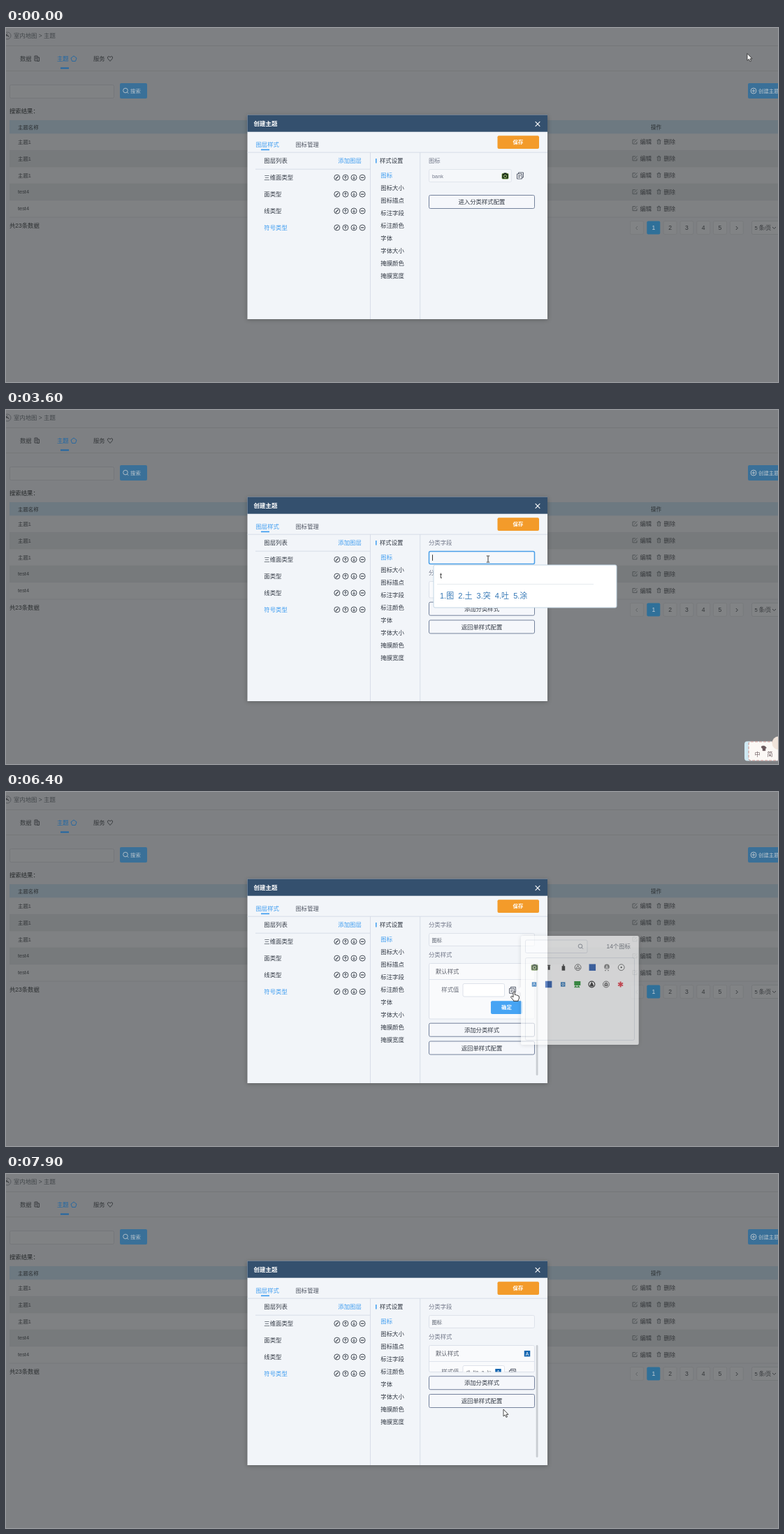
Write an HTML page that moves like this. It is 1105 by 507 pixels and loops after 8000 ms.

```html
<!DOCTYPE html>
<html>
<head>
<meta charset="utf-8">
<style>
html, body { margin: 0; width: 100%; height: 100%; overflow: hidden; background: #7e8083; }
svg { display: block; width: 1105px; height: 507px; }
text { font-family: "Liberation Sans", "Noto Sans CJK SC", "Noto Sans CJK", sans-serif; white-space: pre; }
</style>
</head>
<body>
<svg id="stage" viewBox="0 0 1105 507"></svg>
<script>
const INK = '#333a45', BLUE = '#3f9df0', GREY = '#73798a', DIM = '#34373a', DIMBLUE = '#2067a4';

// Text takes its vertical centre, not the baseline.
const text = (s, x, y, fill = INK, size = 8.4, extra = '') =>
  `<text x="${x}" y="${y + size * .37}" fill="${fill}" font-size="${size}" ${extra}>${s}</text>`;
const mid = (s, x, y, fill, size, extra = '') => text(s, x, y, fill, size, 'text-anchor="middle" ' + extra);
const rect = (x, y, w, h, fill, stroke = 'none', r = 0, extra = '') =>
  `<rect x="${x}" y="${y}" width="${w}" height="${h}" rx="${r}" fill="${fill}" stroke="${stroke}" ${extra}/>`;
const path = (d, stroke = INK, fill = 'none', w = .9) =>
  `<path d="${d}" stroke="${stroke}" fill="${fill}" stroke-width="${w}" stroke-linejoin="round"/>`;
const circle = (x, y, r, fill = 'none', stroke = 'none', w = .9) =>
  `<circle cx="${x}" cy="${y}" r="${r}" fill="${fill}" stroke="${stroke}" stroke-width="${w}"/>`;
const at = (x, y, s) => `<g transform="translate(${x} ${y})">${s}</g>`;
const group = (id, s, extra = '') => `<g id="${id}" ${extra}>${s}</g>`;
const lens = (x, y, c, r = 3) => circle(x, y, r, 'none', c) + path(`M${x + r * .7} ${y + r * .7}l2 2`, c);
const outlineButton = (s, y) => rect(605.5, y + .5, 151, 19, '#f5f7fb', '#74829c', 2) + mid(s, 681, y + 10);
const copies = (x, y) => at(x, y, path('M-2.5-2.5V-4.5H4.5V2.5H2.5M-4.5-2.5H2.5V4.5H-4.5ZM-3 0H1M-3 2H0', '#4b5261'));
const badge = (x, y, s) => rect(x - s / 2, y - s / 2, s, s, '#1767b1', 'none', .5) + mid('A', x, y, '#fff', s * .8);
const camera = (x, y) => at(x, y,
  rect(-4.5, -3.5, 9, 7.5, '#18281b', '#6f9a35', 1, 'stroke-width=".8"') + rect(-2, -4.5, 4, 2, '#18281b') +
  circle(0, .4, 2, 'none', '#b9df78', 1));

function page() {
  let s = rect(0, 0, 1105, 507, '#7e8083') + rect(0, 25, 1105, 1, '#747678') + rect(0, 61, 1105, 1, '#757779');
  s += circle(2, 11, 5, 'none', '#55595d') + path('M4 13Q4 10 0 10M2 8L0 10L2 12', DIM);
  s += text('室内地图 &gt; 主题', 11, 11, '#43474b');
  s += text('数据', 20, 44, DIM) + path('M41 40h4v7h-4zM45 42h2.5v5.500h-3M42 42h2M42 44h2', DIM);
  s += text('主题', 73, 44, DIMBLUE) + path('M97 40l4 3l-1.500 4.500h-5l-1.500-4.500z', DIMBLUE);
  s += rect(78, 56.5, 12, 2, DIMBLUE);
  s += text('服务', 125, 44, DIM) + path('M149 47.500l-3.500-4q-.5-3 2-3l1.500 1.500l1.500-1.500q2.500 0 2 3z', DIM);
  s += rect(5.5, 81.5, 149, 19, '#808284', '#75777a', 2);
  s += rect(163, 79, 39, 22, '#3a7098', 'none', 2) + lens(171, 89.5, '#b9c4cc', 3.3) + text('搜索', 178, 90.5, '#b9c4cc', 7.4);
  s += rect(1062, 79, 46, 22, '#3a7098', 'none', 2) + circle(1070, 90, 4, 'none', '#b9c4cc') +
    path('M1067.500 90h5M1070 87.500v5', '#b9c4cc') + text('创建主题', 1077, 90.5, '#b9c4cc', 7.4);
  s += text('搜索结果：', 5, 119, '#25282a');
  s += rect(5, 132, 1100, 19.5, '#6d7981') + text('主题名称', 17, 142, '#2c3033', 7.4) + text('操作', 923, 142, '#2c3033', 7.6);
  ['主题1', '主题1', '主题1', 'test4', 'test4'].forEach((name, i) => {
    const y = 163 + 23.9 * i;
    s += rect(5, y - 11.5, 1100, 23.9, i % 2 ? '#777a7c' : '#7f8183') + rect(5, y + 12, 1100, .8, '#737678');
    s += text(name, 17, y, DIM, 7.4);
    s += at(900, y, path('M1-3H-3V3H3V0M-1 1L3.500-3.500', '#45494c', 'none', .8)) + text('编辑', 907.5, y, DIM);
    s += at(934.5, y, path('M-3-2H3M-1-2V-3.500H1V-2M-2-2V3H2V-2M0-.5V1.500', '#45494c', 'none', .8)) + text('删除', 941.5, y, DIM);
  });
  s += text('共23条数据', 5, 283, '#2d3032');
  for (let i = 0; i < 7; i++) {
    const x = 903 + 23.8 * i;
    s += rect(x - 9.5, 276.5, 19, 19, i == 1 ? '#2f7099' : '#818385', i == 1 ? 'none' : '#797b7d', 2);
    s += i % 6 ? mid(i, x, 286, i == 1 ? '#c4cfd6' : DIM, 8.6)
      : path(i ? `M${x - 1} 284l2.500 2.500l-2.500 2.500` : `M${x + 1} 284l-2.500 2.500l2.500 2.500`, i ? DIM : '#606366', 'none', 1);
  }
  return s + rect(1067.5, 276.5, 50, 19, '#818385', '#75787a', 2) + text('5 条/页', 1071.5, 286, DIM, 7.6) +
    path('M1097 285l2.500 2.500l2.500-2.500', DIM);
}

function dialog() {
  let s = rect(345, 126, 430.5, 292, '#000', 'none', 1, 'opacity=".25" filter="url(#soft)"');
  s += rect(345.5, 124.5, 429.5, 292.500, '#f2f5f9') + rect(345.5, 124.5, 429.5, 24.2, '#34506e');
  s += text('创建主题', 354.5, 136.7, '#fff', 8.5, 'font-weight="700"') + path('M757.700 134.200l6.600 6.600m0-6.600l-6.600 6.600', '#fff', 'none', 1.1);
  s += text('图层样式', 357.5, 166.7, BLUE) + rect(365, 173.5, 12, 1.7, BLUE) + text('图标管理', 414.5, 166.7, '#505663');
  s += rect(703.5, 154.3, 59.5, 18.7, '#f39b2a', 'none', 2) + mid('保存', 733, 163.3, '#fff', 7.4, 'font-weight="700"');
  s += rect(345.5, 177.7, 429.5, .9, '#d5dbe6') + rect(521, 178, .9, 239, '#d5dbe6') + rect(592.3, 178, .9, 239, '#d5dbe6');
  s += text('图层列表', 369.3, 190) + text('添加图层', 475.3, 190, BLUE) + rect(357, 201.7, 164, .9, '#d5dbe6');
  const marks = ['M-1.800 1.800L1.800-1.800M-1.800 1.800h1', 'M0 2.200V-2M-1.700-.4L0-2.200L1.700-.4', 'M0-2.200V2M-1.700 .4L0 2.200L1.700 .4', 'M-2.200 0H2.200'];
  ['三维面类型', '面类型', '线类型', '符号类型'].forEach((name, i) => {
    const y = 214 + 23.9 * i;
    s += text(name, 369.3, y, i == 3 ? BLUE : INK);
    marks.forEach((d, k) => s += at(473.8 + 12.1 * k, y + .2, circle(0, 0, 4, 'none', INK) + path(d, INK, 'none', k % 3 ? .9 : 1.2)));
  });
  s += rect(529, 187, 1.5, 6.500, BLUE) + text('样式设置', 535, 190);
  ['图标', '图标大小', '图标描点', '标注字段', '标注颜色', '字体', '字体大小', '掩膜颜色', '掩膜宽度']
    .forEach((name, i) => s += text(name, 536.3, 211.3 + 17.9 * i, i ? INK : BLUE));
  return s;
}

const single = () => text('图标', 605, 190, GREY) + rect(605.5, 202.5, 118, 18, '#f5f7fa', '#e0e5ec', 2) +
  text('bank', 610, 212, GREY, 7.4) + camera(714.5, 212) + copies(736, 211.5) + outlineButton('进入分类样式配置', 239);

const classed = () => text('分类字段', 605, 190, GREY) +
  rect(605.5, 202.5, 151, 18, '#f6f8fb', '#dde2ea', 2, 'id="field"') +
  text('图标', 609.5, 212, '#555c6a', 7.3, 'id="typed"') + rect(610, 207.3, .9, 8.500, '#222', 'none', 0, 'id="caret"') +
  text('分类样式', 605, 233.3, GREY) +
  rect(605.5, 245.5, 151, 23, '#f9fafc', '#dce1ea', 2, 'id="card"') + text('默认样式', 615, 257, '#60646e') +
  group('chosen', badge(746, 257.3, 8.5)) +
  group('body', rect(605.5, 268, 151, .9, '#dce1ea') + text('样式值', 623.3, 283, '#686d79') +
    rect(654, 274.5, 59.5, 18.500, '#fff', '#dde2ea', 2) +
    group('value', text('di_tie_a_kou', 658.7, 283.7, '#666b77', 7.4, 'clip-path="url(#valueClip)"') + badge(704.5, 283.3, 8.5)) +
    copies(725, 283.8) + rect(694, 299.3, 45, 18.700, '#46a4f4', 'none', 2) + mid('确定', 716.5, 308.5, '#fff', 7.4, 'font-weight="700"'),
    'clip-path="url(#bodyClip)"') +
  group('buttons', outlineButton('添加分类样式', 274.7) + outlineButton('返回单样式配置', 300.5)) +
  rect(758.7, 245, 2.800, 161, '#c9cdd2', 'none', 1.4, 'id="bar"');

function icons() {
  const tri = 'M0-2.800L2.600 1.800H-2.600Z', square = s => rect(-s / 2, -s / 2, s, s, '#1c4fa8');
  const top = [
    camera(0, 0), rect(-1.5, -2, 3, 5.5, '#2d2d2d') + rect(-2, -3.5, 4, 1.3, '#2d2d2d'),
    rect(-2.3, -2, 4.6, 6.5, '#292929') + rect(-.7, -4.5, 1.4, 3, '#292929'),
    circle(0, 0, 4.4, '#fff', '#444') + path(tri, '#444'), square(9.5),
    circle(0, -1, 3.8, '#777') + path('M-2.500 4.500L0-2.500L2.500 4.500M0-3V4', '#ddd') + path('M-3 4.500h2m2 0h2', '#666'),
    circle(0, 0, 4.4, '#fff', '#555') + circle(0, 0, 1.1, '#333')];
  const low = [
    badge(0, 0, 6.5), square(9.5), rect(-3.2, -3.2, 6.4, 6.4, '#1767b1') + circle(0, 0, 1.5, 'none', '#fff', .8),
    rect(-4.5, -4.5, 9, 6, '#168a22') + path('M-4 4.500l1.500-2l1.500 2m1 0l1.500-2l1.500 2', '#168a22', 'none', 1.4),
    circle(0, 0, 4.4, '#fff', '#222', 1.2) + path('M0-3L2.700 2.500H-2.700Z', '#222', '#222'),
    circle(0, 0, 4.4, '#fff', '#444') + path('M-2 2V-1L0-2.500L2-1V2Z', '#333', '#999'),
    path('M0-4V4M-3.500-2L3.500 2M-3.500 2L3.500-2', '#e02a38', 'none', 2)];
  return top.map((s, i) => at(756.5 + 20.7 * i, 251.2, s)).join('') + low.map((s, i) => at(756 + 20.6 * i, 275.5, s)).join('');
}

const popover = () => rect(737, 206.5, 169, 156, '#000', 'none', 2, 'opacity=".18" filter="url(#soft)"') +
  path('M737 279L733 283.500L737 288Z', 'none', '#fdfdfd') + rect(737, 206, 168.7, 156, '#fdfdfd', 'none', 2) +
  rect(743.5, 212, 88.5, 18.500, '#fff', '#dde1e8', 2) + lens(822, 220.7, '#777d88', 2.8) + text('14个图标', 859.5, 221, '#666b75') +
  rect(743.5, 237.5, 156, 118, '#fdfdfd', '#dde1e8', 2) + icons();

const tooltip = () => rect(728, 247.5, 54.800, 20.500, '#4b515f', 'none', 2) + path('M752.500 268h6l-3 3z', 'none', '#4b515f') +
  mid('di_tie_a_kou', 755.4, 257.7, '#fff', 7.2, 'font-weight="700"');

const inputBar = () => rect(1057, 474.5, 60, 28, '#cfe8f2', 'none', 4) + rect(1063, 475, 60, 27, '#fbf8f5', '#c9908c', 3, 'stroke-dasharray="4 2"') +
  circle(1106, 477, 9.5, '#efe3da') + path('M1081 482l2 -1h2l2 1l1.500 2l-1.500 1v3h-4v-3l-1.500-1z', '#6b5a5e', '#6b5a5e', .4) +
  text('中', 1071.5, 493, '#6b5a5e', 8) + text('简', 1089.5, 493, '#6b5a5e', 8);

const composer = () => rect(612, 222, 234, 61, '#fff', '#c3d6e4', 2, 'id="frame"') + rect(617, 249, 224, .8, '#dfe6ec') +
  text('', 621, 237, '#333', 11, 'id="pinyin"') + text('', 621, 266, '#3477b5', 11, 'id="choices"');

const pointers =
  group('arrow', path('M0 0V10L2.300 8L4 11.500L5.500 10.800L4 7.400H7Z', '#222', '#fff', .8)) +
  group('hand', path('M-1.200 8V1.200Q-1.200 0 0 0Q1.200 0 1.200 1.200V4.600Q3 4 3.400 5.200Q5.200 4.800 5.600 6Q7.200 5.800 7.200 7.400V9.500Q7 11 6 12V13.500H-.8V12.400Q-3 10-4.200 8.400Q-5 7-3.800 6.600Q-3 6.400-1.200 8Z', '#222', '#fff', .9)) +
  group('beam', path('M-2.200-4.500H-.6L0-4L.6-4.500H2.200M0-4V4M-2.200 4.500H-.6L0 4L.6 4.500H2.200', '#222'));

document.getElementById('stage').innerHTML =
  `<defs><filter id="soft" x="-10%" y="-10%" width="120%" height="120%"><feGaussianBlur stdDeviation="3"/></filter>
  <clipPath id="bodyClip"><rect id="window" x="605" y="245" width="152" height="24"/></clipPath>
  <clipPath id="valueClip"><rect x="656" y="275" width="38" height="18"/></clipPath></defs>` +
  page() + dialog() + group('single', single()) + group('classed', classed()) + group('popover', popover()) +
  group('tooltip', tooltip()) + group('composer', composer()) + group('inputBar', inputBar()) + group('pointer', pointers);

const el = {};
document.querySelectorAll('svg [id]').forEach(n => el[n.id] = n);
const set = (id, attrs) => { for (const k in attrs) el[id].setAttribute(k, attrs[k]); };
const fade = (id, a) => set(id, { opacity: a, visibility: a > 0 ? 'visible' : 'hidden' });
const show = (id, on) => set(id, { display: on ? 'inline' : 'none' });
const ramp = (t, from, to) => Math.min(1, Math.max(0, (t - from) / (to - from)));
const smooth = p => p * p * (3 - 2 * p);

// Pointer stops: time, x, y
const stops = [[0, 1061, 36.5], [600, 719, 247], [1000, 719, 247], [1600, 690, 213.500], [4800, 690, 213.500], [5300, 683, 261],
  [5700, 683, 261], [6100, 726, 279], [6300, 726, 279], [6600, 730.500, 305.500], [6900, 756, 275], [7100, 756, 275],
  [7200, 731, 292], [7600, 712, 306], [7700, 712, 306], [7900, 712, 337]];
// Pointer shapes: from time, shape
const shapes = [[0, 'arrow'], [600, 'hand'], [1300, 'arrow'], [1500, 'beam'], [5000, 'arrow'], [5200, 'hand'],
  [6700, 'arrow'], [6900, 'hand'], [7200, 'arrow'], [7400, 'hand'], [7900, 'arrow']];

function place(t) {
  const i = Math.max(0, stops.findLastIndex(s => s[0] <= t));
  const a = stops[i], b = stops[i + 1] || a;
  const p = b === a ? 0 : smooth(ramp(t, a[0], b[0]));
  set('pointer', { transform: `translate(${a[1] + (b[1] - a[1]) * p} ${a[2] + (b[2] - a[2]) * p})` });
  const shape = shapes.findLast(s => s[0] <= t)[1];
  ['arrow', 'hand', 'beam'].forEach(id => show(id, id == shape));
}

function draw(t) {
  const focused = t >= 1600 && t < 5300, typing = t >= 3600 && t < 4400, done = t >= 4400;
  const open = smooth(ramp(t, 5300, 5600)) - smooth(ramp(t, 7700, 8000)), h = 56 * open;
  show('single', t < 1000);
  show('classed', t >= 1000);
  set('field', { stroke: focused ? '#4a9fe8' : '#dde2ea', 'stroke-width': focused ? 1.5 : 1 });
  show('typed', done);
  show('caret', focused && (t >= 3600 ? t < 4900 : Math.floor((t - 1600) / 500) % 2 == 0));
  set('caret', { x: done ? 625 : 610 });
  set('card', { height: 23.5 + h });
  set('window', { height: 24 + h });
  set('buttons', { transform: `translate(0 ${h})` });
  show('body', h > 0);
  show('bar', h > 0);
  show('value', t >= 7100);
  show('chosen', t >= 7800);
  fade('popover', ramp(t, 6200, 6500) * (1 - .75 * ramp(t, 7100, 7300) + (t >= 7400 ? -.25 : 0)) * (t < 7400));
  fade('tooltip', t < 7000 ? 0 : t < 7300 ? 1 : t < 7400 ? .4 : 0);
  show('inputBar', t >= 1700 && t < 5300);
  show('composer', typing);
  if (typing) {
    const n = Math.min(6, Math.floor((t - 3500) / 100));
    el.pinyin.textContent = ['t', 'tu', "tu'b", "tu'bi", "tu'bia", "tu'biao"][n - 1];
    el.choices.textContent = n < 3 ? '1.图  2.土  3.突  4.吐  5.涂' : '1.图标  2.图表  3.突变  4.凸';
    set('frame', { width: n < 3 ? 262 : 234 });
  }
  place(t);
}

function tick(now) {
  draw(Math.floor(now % 8000 / 100) * 100);
  requestAnimationFrame(tick);
}
draw(0);
const start = performance.now();
requestAnimationFrame(function first(now) { tick(Math.max(0, now - start)); });
</script>
</body>
</html>
```
